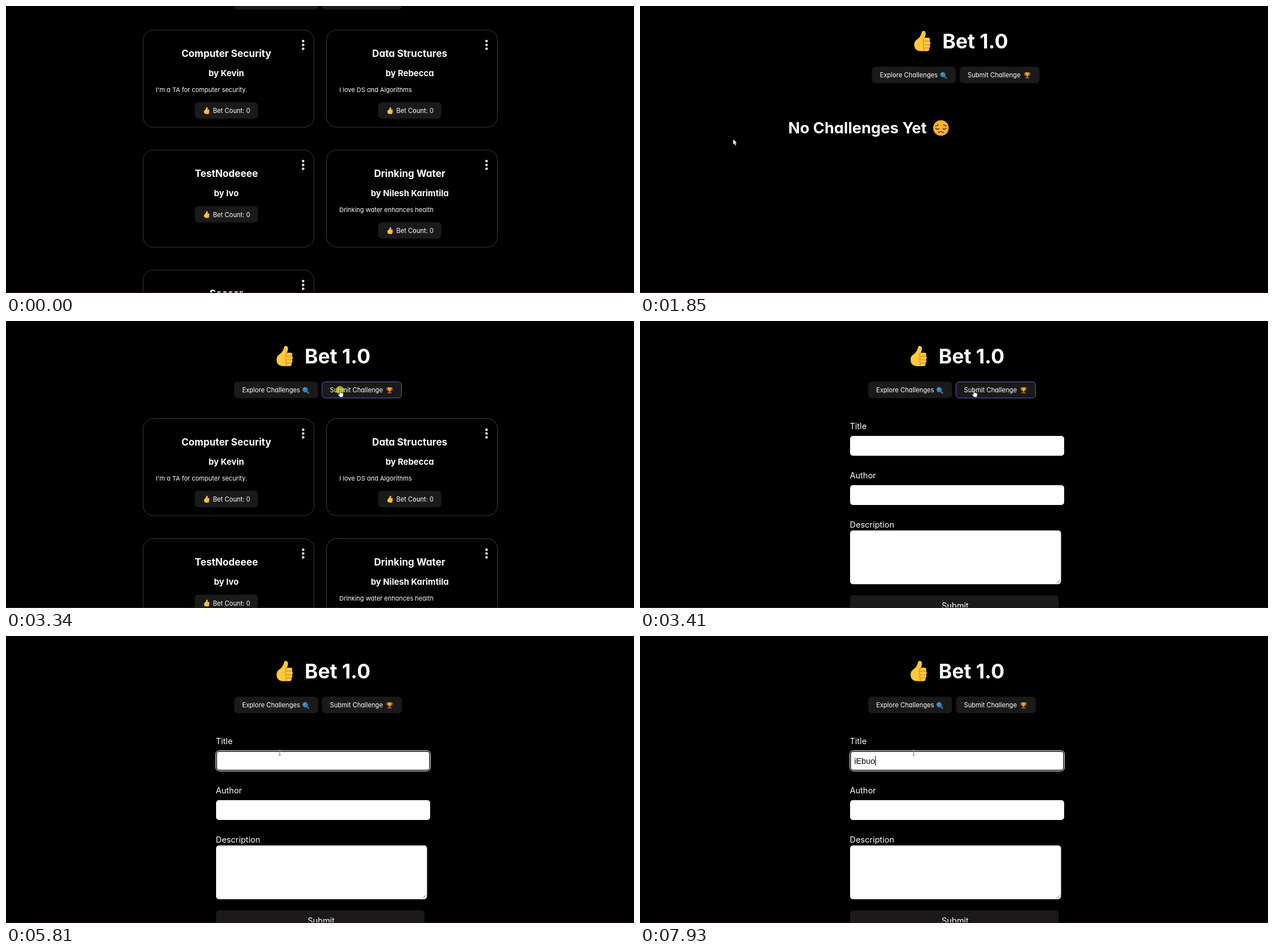
An HTML page that plays this animation: 1106x507 px, repeating every 7.99 s.

```html
<!DOCTYPE html>
<html lang="en">
<head>
<meta charset="utf-8">
<title>Bet 1.0</title>
<style>
  html, body { margin: 0; width: 100%; height: 100%; overflow: hidden; background: #000; }
  svg { display: block; width: 1106px; height: 507px; }
  text { fill: #fff; font-family: Inter, Lato, sans-serif; font-feature-settings: "cv11"; white-space: pre; }
  .logo { font-size: 35.4px; font-weight: 700; }
  .big { font-size: 27.2px; font-weight: 700; }
  .title { font-size: 17.1px; font-weight: 700; }
  .by { font-size: 14.9px; font-weight: 700; }
  .small { font-size: 11.15px; }
  .note { font-size: 11px; }
  .label { font-size: 14.5px; }
  .mid { text-anchor: middle; }
  #typed { fill: #000; font: 14.3px "Liberation Sans", Arial, sans-serif; }
  .btn { fill: #1a1a1a; }
  .field { fill: #fff; }
  .card { fill: none; stroke: #3a3a3a; }
</style>
</head>
<body>
<svg id="stage" viewBox="0 0 1106 507">
  <defs>
    <g id="thumb">
      <path fill="#ffc83d" d="M14 2C15 0 17.500 0 19 1.200C21 3 21 6 20 9L18.700 12.500H25.500C28.500 12.500 29 17 27.500 18.500C29.700 20 29.300 24 27.500 25C29.300 27 28.500 30 26.500 30.700C28 33 26.500 36.300 23 36.300H12C5 36.300 .5 32 .5 25C.5 18.500 4 16.500 8 13.500C11 11 13 6 14 2Z"/>
      <path fill="none" stroke="#d88a14" stroke-width="1.200" stroke-linecap="round" d="M18.700 12.800C16 14 15 17 17.500 18.600H27M17.500 18.600C15 20.500 15.500 24 18 25H27M18 25C15.500 27 16 30 18.500 30.700H26M18.500 30.700C16.500 32.500 17 35 18.500 36"/>
    </g>
    <g id="lens">
      <path stroke="#5d6b80" stroke-width="2.600" stroke-linecap="round" d="M2 2L4.800 4.800"/>
      <circle cx="-1.200" cy="-1.200" r="4.200" fill="#1e8fd0" stroke="#4a7ba8"/>
      <path fill="none" stroke="#6cc4f2" d="M-3.300 -1.500A2.500 2.500 0 0 1 -1 -3.500"/>
    </g>
    <g id="cup">
      <path fill="none" stroke="#d98a1e" stroke-width="1.200" d="M-2.500 -4H-4.700C-4.700 -1.500 -3.500 0 -1.500 0M2.500 -4H4.700C4.700 -1.500 3.500 0 1.500 0"/>
      <path fill="#f5a623" d="M-3.200 -5.300H3.200C3.200 -1.500 2.300 .5 .8 1.200V3H-.8V1.200C-2.300 .5 -3.200 -1.500 -3.200 -5.300Z"/>
      <path fill="#8a5a35" d="M-2.800 2.800H2.800L3.600 5.500H-3.600Z"/>
    </g>
    <g id="sad">
      <circle r="13.700" fill="#ffb02e"/>
      <path fill="none" stroke="#4a2f1c" stroke-width="1.600" stroke-linecap="round" d="M-9.500 .5Q-6.500 3.500 -3.500 1.200M9.500 .5Q6.500 3.500 3.500 1.200M-4.500 8.500Q0 4 4.500 8.500M-9.500 -3.500Q-6.500 -4 -4.500 -6M9.500 -3.500Q6.500 -4 4.500 -6"/>
    </g>
  </defs>

  <g id="page">
    <g id="header"></g>
    <g id="cards"></g>
  </g>
  <g id="empty">
    <text class="big" x="261" y="225">No Challenges Yet</text>
    <use href="#sad" x="530" y="215.500"/>
  </g>
  <g id="form">
    <text class="label" x="369.500" y="190.500">Title</text>
    <text class="label" x="369.500" y="278">Author</text>
    <text class="label" x="369.500" y="365">Description</text>
    <rect class="field" x="370" y="203" width="377" height="35" rx="5"/>
    <g id="focus" fill="none">
      <rect x="370.500" y="203.500" width="376" height="34" rx="5" stroke="#000" stroke-width="2"/>
      <rect x="369.500" y="202.500" width="378" height="36" rx="6" stroke="#fff"/>
    </g>
    <text id="typed" x="377.300" y="225.500"></text>
    <rect id="caret" y="212" width="1" height="17"/>
    <rect class="field" x="370" y="290" width="377" height="35" rx="5"/>
    <rect class="field" x="370" y="370" width="371.500" height="95" rx="5"/>
    <path stroke="#555" d="M734 463.500L740 457.500M738 463.500L740.500 461"/>
    <rect class="btn" x="370" y="484.500" width="367" height="40" rx="6"/>
    <text class="label mid" x="555" y="507.500">Submit</text>
  </g>

  <rect y="506" width="1106" height="1" fill="#2c1620"/>
  <circle id="click" r="7.200" fill="#fff000" fill-opacity=".62"/>
  <g id="pointer">
    <path id="arrow" fill="#fff" stroke="#000" stroke-width=".5" d="M0 0V10.200L2.300 8.200L4 12L5.700 11.200L4.100 7.600H7Z"/>
    <path id="hand" fill="#fff" stroke="#000" stroke-width=".6" d="M-.8 .5C-.8 -.7 1.200 -.7 1.200 .5V4.500L5 5.300C6 5.600 6.300 6.200 6.200 7L5.500 12.500H0L-3 8.500C-3.500 7.500 -2.300 6.700 -.8 8.200Z"/>
    <path id="beam" fill="none" stroke="#777" d="M-2 -4.500H2M0 -4.500V4.500M-2 4.500H2"/>
  </g>
</svg>
<script>
const $ = id => document.getElementById(id);
const LOOP = 7990, WORD = "iEbuo", KEYS = [7270, 7530, 7730, 7830, 7930];

const text = (cls, x, y, s) => `<text class="${cls}" x="${x}" y="${y}">${s}</text>`;
const button = (x, y, w, label, dx = 14) =>
  `<rect class="btn" x="${x}" y="${y}" width="${w}" height="29" rx="6"/>` +
  text("small", x + dx, y + 19.2, label);
const thumb = (x, y, k) => `<use href="#thumb" transform="translate(${x} ${y}) scale(${k})"/>`;

$("header").innerHTML = thumb(476, 43.5, 1) + text("logo", 526, 74.5, "Bet 1.0") +
  button(402, 107.2, 147.5, "Explore Challenges") + `<use href="#lens" x="528" y="122.500"/>` +
  button(556.5, 107.2, 140.5, "Submit Challenge") + `<use href="#cup" x="675.500" y="122.500"/>` +
  `<rect id="hover" x="556.500" y="107.500" width="140" height="28.500" rx="6" fill="none" stroke="#555cd6"/>`;

const cards = [
  ["Computer Security", "Kevin", "I'm a TA for computer security."],
  ["Data Structures", "Rebecca", "I love DS and Algorithms"],
  ["TestNodeeee", "Ivo", ""],
  ["Drinking Water", "Nilesh Karimtila", "Drinking water enhances health"],
  ["Soccer", "", ""]
];
$("cards").innerHTML = cards.map(([title, name, note], i) => {
  const x = 241.5 + i % 2 * 323, y = 172.5 + (i >> 1) * 212;
  const by = note ? 127.5 : 99;
  const dots = [19.5, 26.2, 33].map(d => `<circle cx="281.800" cy="${d}" r="2.300" fill="#e8e8e8"/>`).join("");
  return `<g transform="translate(${x} ${y})">
    <rect class="card" width="301" height="171.500" rx="18"/>${dots}` +
    text("title mid", 146.5, 47.5, title) + text("by mid", 146.5, 81, "by " + name) +
    text("note", 22.5, 109.8, note) + button(91, by, 111, "Bet Count: 0", 32) +
    thumb(107, by + 8.7, .33) + "</g>";
}).join("");

// Pointer moves: start, end, number of jumps, from, bend, to
const moves = [
  [120, 240, 3, [747, 439], [560, 363], [374, 288]],
  [440, 650, 4, [374, 288], [269, 261], [164, 235]],
  [2390, 3080, 11, [164, 235], [376, 178], [588, 122]],
  [3750, 4170, 6, [588, 122], [532, 382], [482, 206]]
];

function pointerAt(t) {
  let pos = null;
  for (const [start, end, n, a, b, c] of moves) {
    if (t < start) break;
    const step = Math.min(n - 1, Math.floor((t - start) / (end - start) * (n - 1) + 1e-6));
    const u = pos ? (step + 1) / n : step / (n - 1);
    const e = u * u * (3 - 2 * u);
    pos = a.map((v, i) => (1 - e) ** 2 * v + 2 * e * (1 - e) * b[i] + e * e * c[i]);
  }
  return pos;
}

const show = (id, on) => $(id).style.display = on ? "" : "none";
const between = (t, a, b) => t >= a && t < b;
const ramp = (t, a, d) => Math.max(0, Math.min(1, (t - a) / d));
const inside = ([x, y], l, t, r, b) => x > l && x < r && y > t && y < b;

function draw(t) {
  const empty = between(t, 1850, 2330), form = t >= 3410;
  $("page").setAttribute("transform", `translate(0 ${t < 1850 ? -130 : 0})`);
  $("header").setAttribute("transform", `translate(${empty ? 6.5 : 0} 0)`);
  show("cards", !empty && !form);
  show("empty", empty);
  show("form", form);
  $("hover").style.opacity = ramp(t, 3080, 250) - ramp(t, 3750, 250);

  const pos = pointerAt(t);
  show("pointer", pos);
  if (pos) {
    const at = `translate(${pos.map(Math.round).join(" ")})`;
    $("pointer").setAttribute("transform", at);
    $("click").setAttribute("transform", at);
    const hand = t > 2330 && inside(pos, 556, 107, 697, 137);
    const beam = form && (inside(pos, 370, 203, 747, 238) || inside(pos, 370, 290, 747, 325));
    show("hand", hand);
    show("beam", beam);
    show("arrow", !hand && !beam);
  }
  show("click", between(t, 650, 800) || between(t, 3270, 3410) || between(t, 4206, 4340));

  const count = KEYS.filter(k => t >= k).length;
  $("typed").textContent = WORD.slice(0, count);
  show("focus", t >= 4206);
  show("caret", t >= 4206 && (count || Math.floor((t - 4206) / 532) % 2 === 0));
  $("caret").setAttribute("x", Math.round(377 + (count && form ? $("typed").getComputedTextLength() : 0)));
}

function frame() {
  draw(performance.now() % LOOP);
  requestAnimationFrame(frame);
}
frame();
</script>
</body>
</html>
```
